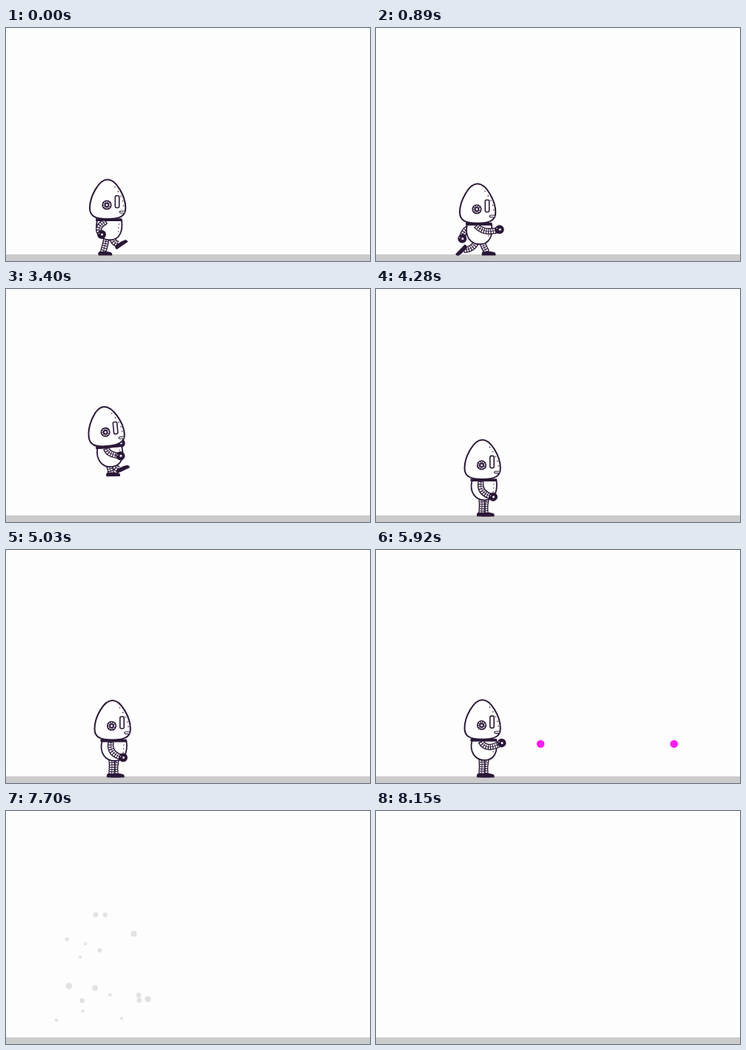
Write an HTML page with a canvas that moves like this. It is 491x316 px and loops after 9.2 s.

```html
<!DOCTYPE html>
<html lang="en">
<head>
<meta charset="utf-8">
<title>Walking robot</title>
<style>
html, body { margin: 0; width: 100%; height: 100%; overflow: hidden; background: #fdfdfd; }
canvas { display: block; width: 491px; height: 316px; }
</style>
</head>
<body>
<canvas id="stage"></canvas>
<script>
const W = 491, H = 316, LOOP = 9200, STEP = 148.15;
const INK = '#2b1838', PAPER = '#fefefe', BACK = '#fdfdfd', GROUND = '#cbcbcb', SHOT = '#ff1df5';
const DUST = 'rgba(130,130,130,.5)';
const STRIDE = 4.6, FLOOR = 304, TAU = Math.PI * 2;
// Act boundaries, in steps
const JUMP_1 = 9, LAND_1 = 13, JUMP_2 = 20, LAND_2 = 24, FIRE = 36, ADVANCE = 41, BURST = 48, END = 55;
const RELOAD = 3, SHOT_SPEED = 60;

const canvas = document.getElementById('stage');
const ctx = canvas.getContext('2d');
const scale = window.devicePixelRatio || 1;
canvas.width = W * scale;
canvas.height = H * scale;

const mix = (a, b, u) => a + (b - a) * u;
const mixAll = (a, b, u) => a.map((v, i) => mix(v, b[i], u));
const wrap = q => q - Math.floor(q);

function blend(a, b, u) {
  const pose = {};
  for (const k in a) pose[k] = Array.isArray(a[k]) ? mixAll(a[k], b[k], u) : mix(a[k], b[k], u);
  return pose;
}

// Limbs are [joint x, y, end x, y]; legs add the foot angle
const leg = (x, y = FLOOR, angle = 0, push = 0) => [(138 + x) / 2 + 4 * push, 293 + 9 * push, x, y, angle];

const IDLE = {
  dx: 6.5, lift: 0, tilt: 0, bob: -1.5,
  nearLeg: leg(136), farLeg: leg(141),
  nearArm: [132, 279, 151.5, 283], farArm: [136, 272, 144, 280]
};
const JUMP = {
  dx: 0, lift: -46, tilt: -.1, bob: 0,
  nearLeg: leg(138, 296, .08), farLeg: leg(151, 291, -.35),
  nearArm: [136, 271, 153, 274], farArm: [147, 270, 155, 257]
};
const AIM_ARM = [142, 276, 163, 264];

// The foot slides back on the floor, then lifts toe-last and swings forward
function stride(phase) {
  const q = wrap(phase), a = TAU * q;
  const x = 137.25 - 10.5 * Math.cos(a) - 20 * Math.sin(a) + 4.25 * Math.cos(2 * a);
  const swing = (q - .26) / .52;
  if (swing < 0 || swing > 1) return leg(x);
  const push = Math.max(0, 1 - 2.2 * swing);
  return leg(x, FLOOR - 11 * Math.sin(Math.PI * swing), 3.6 * push - .6, push);
}

const armSwing = (s, lag) =>
  [131 + 12 * s - lag, 271 + 4 * s, 141 + 23 * s - lag, 280 - 15 * Math.max(0, s) ** 3];

function walk(steps) {
  const q = steps / STRIDE, s = Math.sin(TAU * q), c = Math.cos(TAU * q);
  return {
    dx: 0, lift: 0, tilt: 0, bob: 6.5 * s * s,
    nearLeg: stride(q), farLeg: stride(q + .5),
    nearArm: armSwing(s, 12 * c), farArm: armSwing(-s, 3)
  };
}

// Crouch, slow rise, quick drop
const jump = (from, u) => blend(from, JUMP, Math.sin(Math.PI * u ** 2.4));

function idle(n) {
  const pose = { ...IDLE };
  const landed = n - LAND_2;
  pose.bob += Math.sin((n - 34) * .7) + 4 * Math.exp(-landed);
  if (n >= FIRE && n % RELOAD < 2) pose.nearArm = AIM_ARM;
  return pose;
}

function advance(n) {
  const pose = walk(n - ADVANCE - .25);
  pose.nearArm = mixAll(pose.nearArm, AIM_ARM, n % RELOAD < 2 ? .85 : .2);
  return pose;
}

function poseAt(n) {
  const secondWalk = n => walk(n - LAND_1 + .5);
  if (n < JUMP_1) return walk(n);
  if (n < LAND_1) return jump(walk(JUMP_1), (n - JUMP_1) / (LAND_1 - JUMP_1));
  if (n < JUMP_2) return secondWalk(n);
  if (n < LAND_2) return jump(secondWalk(JUMP_2), (n - JUMP_2) / (LAND_2 - JUMP_2));
  return n < ADVANCE ? idle(n) : advance(n);
}

function disc(x, y, r, color) {
  ctx.fillStyle = color;
  ctx.beginPath();
  ctx.arc(x, y, r, 0, TAU);
  ctx.fill();
}

function line(path, color, width, dash = []) {
  ctx.strokeStyle = color;
  ctx.lineWidth = width;
  ctx.setLineDash(dash);
  ctx.stroke(path);
}

function shape(path, width = 2) {
  const p = new Path2D(path);
  ctx.fillStyle = PAPER;
  ctx.fill(p);
  line(p, INK, width);
}

function tube(x, y, [kx, ky, ex, ey]) {
  const p = new Path2D(`M${x} ${y}Q${kx} ${ky} ${ex} ${ey}`);
  line(p, INK, 8.5);
  line(p, PAPER, 5.9);
  line(p, INK, 6.5, [1.2, 1.9]);
  line(p, INK, .8);
}

function drawLeg(hipX, bob, limb) {
  tube(hipX, 283 + bob, limb);
  ctx.save();
  ctx.translate(limb[2], limb[3]);
  ctx.rotate(limb[4]);
  ctx.fillStyle = INK;
  ctx.fill(new Path2D('M-5 -1H5L10 0Q13 1 12 4.5H-6Q-8 2 -5 -1Z'));
  ctx.restore();
}

function drawArm(x, limb) {
  tube(x, 262, limb);
  const [, , hx, hy] = limb;
  disc(hx, hy, 6, INK);
  disc(hx + .5, hy, 1.5, PAPER);
  disc(hx - 3.6, hy - 1.5, .7, PAPER);
}

function torso() {
  shape('M123 261C119 277 128 287.5 140 287.5C153 287.5 158 276 156 261Z', 1.8);
  for (let i = 0; i < 3; i++) disc(152.5 - i * .4, 266 + i * 5, .7, INK);
}

function head() {
  line(new Path2D('M121 260H156.5'), INK, 3.5);
  shape('M137 205.5C149 205.5 161.3 229 161.3 244C161.3 255 154 259 137 259S113 255 113 244C113 229 125 205.5 137 205.5Z');
  disc(136, 240, 6.6, INK);
  const ear = new Path2D();
  ear.arc(136, 240, 4.2, 0, TAU);
  line(ear, PAPER, 1.7, [1.5, 1.14]);
  disc(136, 240, 1.5, PAPER);
  const eye = new Path2D();
  eye.roundRect(147.3, 227.5, 5.4, 16.2, 1.6);
  line(eye, INK, 1.6);
  shape('M160 248.3H155Q153 248.5 153 249.6T155 251H159.5', 1.1);
  for (let i = 0; i < 5; i++) disc(147 + 11.5 * Math.sin(i * .38), 215.5 + i * 6.4, .8, INK);
}

function robot(pose) {
  const { bob } = pose;
  ctx.save();
  ctx.translate(137 + pose.dx, 259 + pose.lift);
  ctx.rotate(pose.tilt);
  ctx.translate(-137, -259);
  ctx.save();
  ctx.translate(0, bob);
  drawArm(132, pose.farArm);
  ctx.restore();
  drawLeg(143, bob, pose.farLeg);
  drawLeg(136, bob, pose.nearLeg);
  ctx.translate(0, bob);
  torso();
  drawArm(135, pose.nearArm);
  head();
  ctx.restore();
}

function dust(age, life) {
  if (age < 1 || age > life) return;
  for (const [vx, vy] of [[12.5, -28], [19, -17], [-17.5, -7], [13, -21]]) {
    disc(137 + vx * age, 305 + vy * age + 6 * age * age, 2.5, DUST);
  }
}

function bullets(n) {
  for (let start = FIRE; start < n; start += RELOAD) {
    const x = 162 + SHOT_SPEED * (n - start);
    if (x < W + 5) disc(x, 263, 5.3, SHOT);
  }
}

function burst(age) {
  let seed = 17;
  const random = () => (seed = seed * 16807 % 2147483647) / 2147483647;
  const t = age + .5;
  ctx.globalAlpha = 1 - age / (END - BURST);
  for (let i = 0; i < 24; i++) {
    const vx = (random() - .5) * 31, vy = -20 - random() * 58;
    disc(137 + vx * t, 258 + vy * t + 11 * t * t, 2 + random() * 2.5, DUST);
  }
  ctx.globalAlpha = 1;
}

function draw(time) {
  const n = Math.floor((time % LOOP + 16) / STEP);
  ctx.setTransform(scale, 0, 0, scale, 0, 0);
  ctx.fillStyle = BACK;
  ctx.fillRect(0, 0, W, H);
  ctx.fillStyle = GROUND;
  ctx.fillRect(0, 307, W, 9);
  if (n < BURST) {
    robot(poseAt(n));
    dust(n - LAND_1, 2);
    dust(n - LAND_2, 3);
    bullets(n);
  } else if (n < END) {
    burst(n - BURST);
  }
}

const begin = performance.now();
function tick() {
  draw(performance.now() - begin);
  requestAnimationFrame(tick);
}
tick();
</script>
</body>
</html>
```
